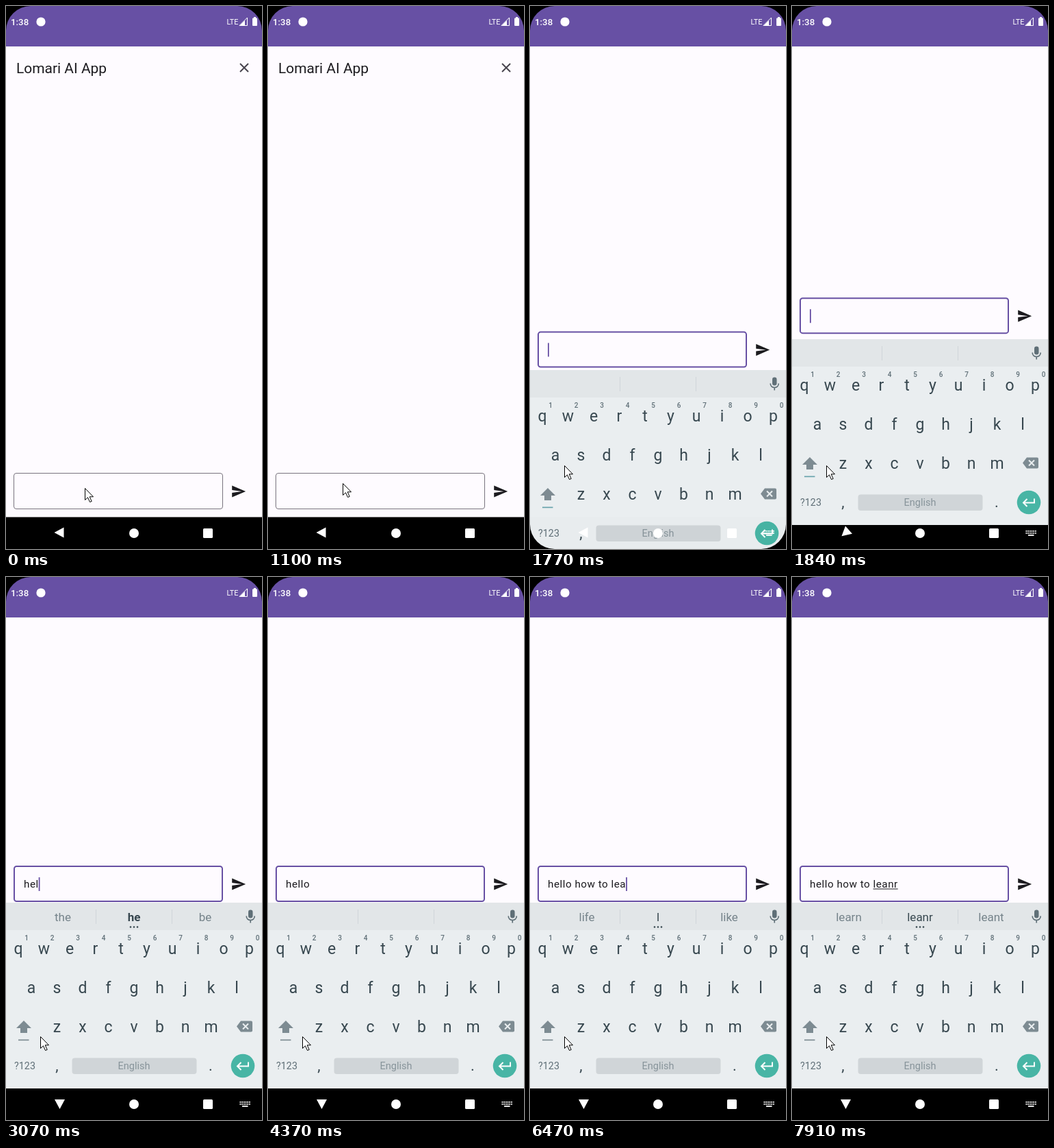
Write an HTML page with a canvas that moves like this. It is 374 by 792 pixels and loops after 8000 ms.

```html
<!DOCTYPE html>
<html lang="en">
<head>
<meta charset="utf-8">
<title>Chat keyboard demo</title>
<style>
html, body { margin: 0; width: 100%; height: 100%; overflow: hidden; background: #000; }
canvas { display: block; }
</style>
</head>
<body>
<canvas id="stage" width="374" height="792"></canvas>
<script>
const W = 374, H = 792, LOOP = 8000, PAN = 260;
const PAPER = '#fefbff', DARK = '#1c1b1f', PURPLE = '#6750a4';
const KEYS = '#eaeef0', INK = '#37474f', GREY = '#7d8b92', HINT = '#5f6f77';
const screen = document.getElementById('stage').getContext('2d');
const layer = document.createElement('canvas');
layer.width = W;
layer.height = H;
const keyLayer = layer.getContext('2d');
let g = screen;

// Typing: time and the whole text after the key press.
const typed = [
  [1540, ''], [2620, 'h'], [2700, 'he'], [3070, 'hel'], [3240, 'hell'], [3540, 'hello'],
  [3870, 'hello '], [4740, 'hello h'], [4820, 'hello ho'], [4900, 'hello how'],
  [5110, 'hello how '], [5510, 'hello how t'], [5600, 'hello how to'], [5770, 'hello how to '],
  [6270, 'hello how to l'], [6440, 'hello how to le'], [6470, 'hello how to lea'],
  [6640, 'hello how to lean'], [7400, 'hello how to leanr']
];
// Suggestion strip: time and three words; * marks a bold word.
const hints = [
  [0, ''], [2840, 'the *he be'], [3200, 'help *hel held'], [3340, 'help *hell hello'],
  [3670, 'cello *hello Hello'], [4100, ''], [5040, 'hot *how however'], [5340, ''],
  [5740, 'go *to two'], [6010, ''], [6410, 'life l like'], [6570, 'learn lea leave'],
  [6740, 'learn lean leans'], [7510, 'learn leanr leant']
];
const latest = (list, t) => list.filter(e => e[0] <= t).pop();
const progress = (t, start, span) => Math.min(1, Math.max(0, (t - start) / span));

// Cubic Bezier easing, solved by bisection.
function bezier(x, x1, y1, x2, y2) {
  const at = (s, a, b) => 3 * s * (1 - s) ** 2 * a + 3 * s * s * (1 - s) * b + s ** 3;
  let lo = 0, hi = 1;
  for (let i = 0; i < 24; i++) {
    const mid = (lo + hi) / 2;
    if (at(mid, x1, x2) < x) lo = mid; else hi = mid;
  }
  return at(hi, y1, y2);
}

function rect(x, y, w, h, color, r = 0) {
  g.fillStyle = color;
  g.beginPath();
  g.roundRect(x, y, w, h, r);
  g.fill();
}
function disc(x, y, r, color) {
  g.fillStyle = color;
  g.beginPath();
  g.arc(x, y, r, 0, 7);
  g.fill();
}
function text(s, x, y, size, color, align = 'center', weight = 400) {
  g.font = `${weight} ${size}px Roboto, sans-serif`;
  g.textAlign = align;
  g.fillStyle = color;
  g.fillText(s, x, y);
}
function shape(d, x, y, color, scale = 1, turn = 0) {
  g.save();
  g.translate(x, y);
  g.rotate(turn);
  g.scale(scale, scale);
  g.fillStyle = color;
  g.fill(new Path2D(d));
  g.restore();
}
function line(d, x, y, color, width) {
  g.save();
  g.translate(x, y);
  g.strokeStyle = color;
  g.lineWidth = width;
  g.stroke(new Path2D(d));
  g.restore();
}

function drawField(t) {
  const stroke = 1 + progress(t, 1500, 150);
  g.strokeStyle = stroke > 1 ? PURPLE : '#79747e';
  g.lineWidth = stroke;
  g.beginPath();
  g.roundRect(11 + stroke / 2, 681 + stroke / 2, 306 - stroke, 53 - stroke, 3.5);
  g.stroke();
  shape('M2 21L23 12 2 3V10L17 12 2 14z', 328.3, 696.6, DARK, 0.95);
  if (t < typed[0][0]) return;

  const [pressed, value] = latest(typed, t);
  g.letterSpacing = '0.5px';
  text(value, 26, 713, 15.25, DARK, 'left');
  const width = s => g.measureText(s).width;
  const end = 26 + width(value);
  const word = value.split(' ').pop();
  const [hinted, words] = latest(hints, t);
  if (word && words && hinted > pressed) {
    const from = 26 + width(value.slice(0, -word.length));
    rect(from, 714.5, end - from, 1, DARK);
  }
  g.letterSpacing = '0px';
  if ((t - pressed) % 1000 < 500) rect(end, 698, 1.8, 20, PURPLE);
}

function drawContent(t) {
  rect(0, 0, W, H, PAPER);
  g.save();
  g.translate(0, -PAN * (1 - (1 - progress(t, 1706, 240)) ** 5));
  text('Lomari AI App', 15, 97.5, 20.95, DARK, 'left');
  line('M-6-6L6 6M6-6L-6 6', 348, 90, '#49454f', 2);
  drawField(t);
  g.restore();
}

function drawStatus() {
  rect(0, 0, W, 59, PURPLE);
  text('1:38', 7, 28, 13.3, '#fff', 'left', 500);
  disc(51, 23, 6.6, '#fff');
  text('LTE', 322.5, 27, 10.8, '#fff', 'left');
  line('M0 11.5H11.5V0z', 341, 17, '#fff', 1);
  shape('M0 12L8 4V12z', 341, 17, '#fff');
  rect(360, 17.5, 7, 11.5, '#fff', 1);
  rect(362, 16, 3, 2, '#fff');
}

function drawKeys(t) {
  rect(0, 475, W, 271, KEYS);
  rect(0, 475, W, 40, '#e2e6e8');
  for (const x of [131, 242]) rect(x, 485, 1, 21, '#d0d6d9');

  const words = latest(hints, t)[1];
  if (words) {
    words.split(' ').forEach((w, i) => {
      const bold = w[0] === '*';
      text(w.replace('*', ''), [83, 187, 291][i], 501.5, 17, i === 1 ? INK : '#75838a',
        'center', bold ? 700 : 400);
    });
    for (const x of [182, 187, 192]) disc(x, 510.5, 1.3, INK);
  }

  rect(354, 485.5, 6.5, 12, HINT, 3.2);
  line('M-6 0C-6 8 6 8 6 0M0 6V10', 357.2, 494.5, HINT, 1.7);

  [['qwertyuiop', 18, 549.5], ['asdfghjkl', 37, 607], ['zxcvbnm', 74.5, 664]].forEach(([row, x, y]) =>
    [...row].forEach((c, i) => text(c, x + 37.5 * i, y, 23, INK)));
  for (let i = 0; i < 10; i++) {
    text((i + 1) % 10, 30 + 37.5 * i, 529.5, 10, HINT, 'center', 500);
  }

  shape('M0-9L11 2H5V9H-5V2H-11z', 26, 656, GREY);
  rect(18, 674.5, 15.5, 1.7, t < 1900 ? '#68a3ac' : GREY);
  shape('M-11 0L-5-8H10Q12-8 12-6V6Q12 8 10 8H-5z', 348, 655.5, GREY);
  line('M-4-4L4 4M4-4L-4 4', 350, 655.5, KEYS, 2);

  text('?123', 27.5, 718, 14.3, HINT);
  text(',', 74.5, 720, 22, INK);
  text('.', 299, 720, 22, INK);
  rect(96.5, 701.5, 182, 23.5, '#d0d5d8', 4);
  text('English', 187, 718, 14.5, '#87949a');
  disc(346, 713, 17.3, '#48b5a5');
  line('M8-5V1H-7M-2.5-4.5L-8 1L-2.5 6.5', 346, 712.5, '#fff', 2);
}

function drawKeyboard(t) {
  const p = bezier(progress(t, 1677, 241), 0.2, 0, 0, 1);
  if (t < 1677) return;
  g = keyLayer;
  g.clearRect(0, 0, W, H);
  drawKeys(t);
  g = screen;
  g.globalAlpha = Math.min(1, p * 1.25);
  g.drawImage(layer, 0, Math.round(271 * (1 - p)));
  g.globalAlpha = 1;
}

function drawNav(t) {
  const turn = bezier(progress(t, 1774, 200), 0.4, 0, 0.2, 1);
  shape('M-8 0L6-7.5V7.5z', 78.5, 768, '#fff', 1, -turn * Math.PI / 2);
  disc(187, 769, 7, '#fff');
  rect(288, 762, 14, 14, '#fff', 1.5);
  g.globalAlpha = progress(t, 1620, 110);
  for (let i = 0; i < 6; i++) {
    for (const y of [765, 768]) rect(341.5 + i * 2.7, y, 1.8, 1.8, '#fff');
  }
  rect(345, 771, 8.5, 1.8, '#fff');
  g.globalAlpha = 1;
}

function drawPointer(t) {
  const ease = x => x * x * (3 - 2 * x);
  const a = ease(progress(t, 0, 670)), b = ease(progress(t, 1070, 260));
  const x = Math.round(115 - 4 * a - 61 * b) + 0.5;
  const y = Math.round(703 - 6 * a - 27 * b) + 0.5;
  const arrow = 'M0 0V17L4 13.3L7 20L9.7 19L6.7 12.3H12z';
  shape(arrow, x, y, '#fff');
  line(arrow, x, y, '#000', 1);
}

function draw(now) {
  const t = now % LOOP;
  drawContent(t);
  drawStatus();
  rect(0, 745.5, W, 47, '#000');
  drawKeyboard(t);
  drawNav(t);
  g.fillStyle = '#000';
  g.beginPath();
  g.rect(0, 0, W, H);
  g.roundRect(0, 0, W, H, 36);
  g.fill('evenodd');
  drawPointer(t);
}

const start = performance.now();
function tick() {
  draw(performance.now() - start);
  requestAnimationFrame(tick);
}
tick();
</script>
</body>
</html>
```
